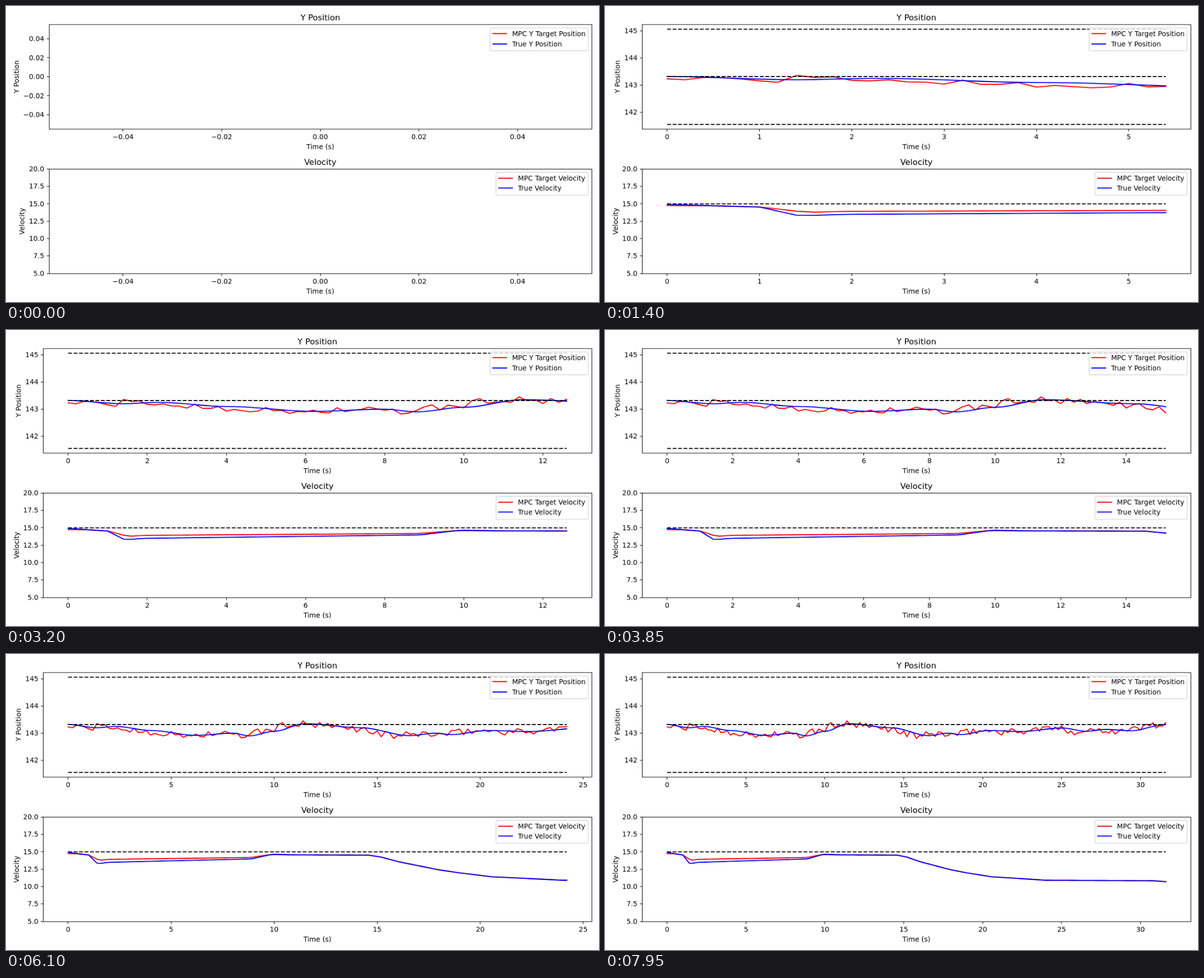
Animation, 1058 px wide and 529 px high, one loop 8 s. Source, as an HTML page with a canvas:

```html
<!DOCTYPE html>
<html lang="en">
<head>
<meta charset="utf-8">
<title>Position and velocity</title>
<style>
  html, body { margin: 0; width: 100%; height: 100%; overflow: hidden; background: #fff; }
  canvas { display: block; width: 1058px; height: 529px; }
</style>
</head>
<body>
<canvas id="stage" width="1200" height="600"></canvas>
<script>
// Plotted on a 1200 x 600 sheet at 100 dpi, shown scaled to the stage.
const ctx = document.getElementById('stage').getContext('2d');
const STEP_MS = 50, STEPS = 160, DT = 0.2;
const PT = 100 / 72, EM = 10 * PT, RIGHT = 1185;
const RED = '#f00', BLUE = '#00f';

const linear = u => u;
const smooth = u => u * u * (3 - 2 * u);

// Eased path through [time, value] key points.
function path(keys, ease) {
  return t => {
    let k = 1;
    while (k < keys.length - 1 && keys[k][0] < t) k++;
    const [t0, a] = keys[k - 1], [t1, b] = keys[k];
    return a + (b - a) * ease(Math.min(1, Math.max(0, (t - t0) / (t1 - t0))));
  };
}

// Seeded value between -1 and 1.
function noise(i) {
  const s = Math.sin(i * 12.9898 + 4.1) * 43758.5453;
  return 2 * (s - Math.floor(s)) - 1;
}

const trueY = path([
  [0, 143.32], [1.4, 143.2], [2.3, 143.25], [4, 143.1], [6.2, 142.92], [8, 143],
  [8.8, 142.9], [10, 143.07], [11.5, 143.35], [14.2, 143.2], [16.6, 142.91],
  [17.8, 143], [18.6, 142.95], [20.4, 143.1], [22.4, 143.06], [25, 143.19],
  [26.6, 143.07], [27.8, 143.14], [29.4, 143.09], [31.6, 143.32]
], smooth);

const trueV = path([
  [0, 14.91], [1, 14.53], [1.4, 13.37], [1.6, 13.35], [1.9, 13.48], [8.9, 13.98],
  [9.9, 14.64], [10.8, 14.56], [14.6, 14.51], [15.2, 14.23], [16, 13.59],
  [18, 12.4], [19, 11.96], [20.6, 11.4], [24, 10.91], [30.8, 10.84], [31.6, 10.7]
], linear);

const gapV = path([
  [0, -0.16], [0.5, 0], [1, 0.02], [1.4, 0.57], [1.6, 0.45], [9, 0.2], [9.8, 0.02]
], linear);

// The position target leads the true path and jitters around it.
const targetY = t => trueY(t + 0.6) - 0.01 + 0.13 * noise(Math.round(t / DT));
const targetV = t => trueV(t) + gapV(t);

const charts = [
  {
    title: 'Y Position', top: 37.5, bottom: 249.3, range: [141.385, 145.235],
    emptyRange: [-0.055, 0.055], labelX: 30, emptyLabelX: 26, legendX: 205.3,
    limits: [141.56, 143.31, 145.06],
    names: ['MPC Y Target Position', 'True Y Position'], curves: [targetY, trueY]
  },
  {
    title: 'Velocity', top: 330.4, bottom: 542, range: [5, 20],
    emptyRange: [5, 20], labelX: 26, emptyLabelX: 37, legendX: 193.5,
    limits: [15],
    names: ['MPC Target Velocity', 'True Velocity'], curves: [targetV, trueV]
  }
];

function setFont(size) { ctx.font = size + 'px "DejaVu Sans", sans-serif'; }

function text(str, x, y, align = 'center', size = EM) {
  setFont(size);
  ctx.fillStyle = '#000';
  ctx.textAlign = align;
  ctx.fillText(str, x, y);
}

function stroke(points, color, width) {
  ctx.beginPath();
  points.forEach(([x, y]) => ctx.lineTo(x, y));
  ctx.strokeStyle = color;
  ctx.lineWidth = width;
  ctx.stroke();
}

function crisp(v) { return Math.floor(v) + 0.5; }

function label(v, digits) {
  return (v < -1e-9 ? '\u2212' : '') + Math.abs(v).toFixed(digits);
}

// Round ticks with a limited number of intervals in view.
function makeTicks(lo, hi, bins) {
  const raw = (hi - lo) / bins;
  const mag = 10 ** Math.floor(Math.log10(raw));
  const step = mag * [1, 2, 2.5, 5, 10].find(s => s * mag >= raw - 1e-9);
  let digits = 0;
  while (Math.abs(step * 10 ** digits - Math.round(step * 10 ** digits)) > 1e-6) digits++;
  const ticks = [];
  for (let k = Math.ceil(lo / step - 1e-9); k * step <= hi + 1e-9; k++) {
    ticks.push([k * step, label(k * step, digits)]);
  }
  return ticks;
}

// The plot narrows when the last tick label would hang over its edge.
function layout(n) {
  const end = Math.max(0, (n - 1) * DT);
  const lo = end ? -0.05 * end : -0.055, hi = end ? 1.05 * end : 0.055;
  const left = n ? 75.3 : 87.1;
  const ticks = makeTicks(lo, hi, 9);
  const [v, str] = ticks[ticks.length - 1];
  setFont(EM);
  ctx.textAlign = 'left';
  const m = ctx.measureText(str);
  const half = (m.actualBoundingBoxRight + m.actualBoundingBoxLeft) / 2;
  const room = (hi - v) / (hi - lo) * (RIGHT - left);
  const right = RIGHT - Math.max(0, half - room);
  const x = t => left + (t - lo) / (hi - lo) * (right - left);
  return { left, right, ticks, x, end, mid: (left + right) / 2 };
}

function drawCurves(chart, n, box, y) {
  ctx.lineJoin = 'round';
  ctx.lineCap = 'square';
  chart.curves.forEach((curve, c) => {
    const points = Array.from({ length: n }, (_, i) => [box.x(i * DT), y(curve(i * DT))]);
    stroke(points, c ? BLUE : RED, 1.5 * PT);
  });
  ctx.lineCap = 'butt';
  ctx.setLineDash([5.55 * PT, 2.4 * PT]);
  chart.limits.forEach(v => {
    const row = Math.round(y(v));
    stroke([[box.x(0), row], [box.x(box.end), row]], '#000', 1.5 * PT);
  });
  ctx.setLineDash([]);
}

function drawAxes(chart, box, range, y) {
  const l = crisp(box.left), r = crisp(box.right);
  const t = crisp(chart.top), b = crisp(chart.bottom);
  const width = 0.8 * PT, len = 3.5 * PT;
  ctx.lineCap = 'butt';
  ctx.lineJoin = 'miter';
  stroke([[l, t], [r, t], [r, b], [l, b], [l, t], [r, t]], '#000', width);
  box.ticks.forEach(([v, str]) => {
    const x = box.x(v);
    stroke([[crisp(x), b], [crisp(x), b + len]], '#000', width);
    text(str, x, Math.round(chart.bottom + 20.6));
  });
  makeTicks(...range, 7).forEach(([v, str]) => {
    const row = crisp(y(v));
    stroke([[l - len, row], [l, row]], '#000', width);
    text(str, box.left - 2 * len, Math.round(y(v) + 4.7), 'right');
  });
}

function drawLabels(chart, n, box) {
  text('Time (s)', box.mid, Math.round(chart.bottom + 40.6));
  text(chart.title, box.mid, Math.round(chart.top - 8.4), 'center', 12 * PT);
  ctx.save();
  ctx.translate(n ? chart.labelX : chart.emptyLabelX, (chart.top + chart.bottom) / 2);
  ctx.rotate(-Math.PI / 2);
  text(chart.title, 0, 0);
  ctx.restore();
}

function drawLegend(chart, box) {
  const x = box.right - chart.legendX;
  ctx.beginPath();
  ctx.roundRect(x, chart.top + 6.9, chart.legendX - 6.9, 46.3, 2 * PT);
  ctx.fillStyle = 'rgba(255,255,255,0.8)';
  ctx.fill();
  ctx.strokeStyle = 'rgba(204,204,204,0.8)';
  ctx.lineWidth = PT;
  ctx.stroke();
  ctx.lineCap = 'square';
  chart.names.forEach((name, i) => {
    const row = Math.round(chart.top + 18.6 + i * 20.4);
    stroke([[x + 0.4 * EM, row], [x + 2.4 * EM, row]], i ? BLUE : RED, 1.5 * PT);
    text(name, x + 3.2 * EM, row + 5, 'left');
  });
}

function draw(n) {
  ctx.fillStyle = '#fff';
  ctx.fillRect(0, 0, 1200, 600);
  const box = layout(n);
  charts.forEach(chart => {
    const range = n ? chart.range : chart.emptyRange;
    const [lo, hi] = range;
    const y = v => chart.bottom - (v - lo) / (hi - lo) * (chart.bottom - chart.top);
    if (n > 1) drawCurves(chart, n, box, y);
    drawAxes(chart, box, range, y);
    drawLabels(chart, n, box);
    drawLegend(chart, box);
  });
}

const start = performance.now();
function tick() {
  const ms = Math.max(0, performance.now() - start);
  draw(Math.floor(ms / STEP_MS) % STEPS);
  requestAnimationFrame(tick);
}
tick();
</script>
</body>
</html>
```
